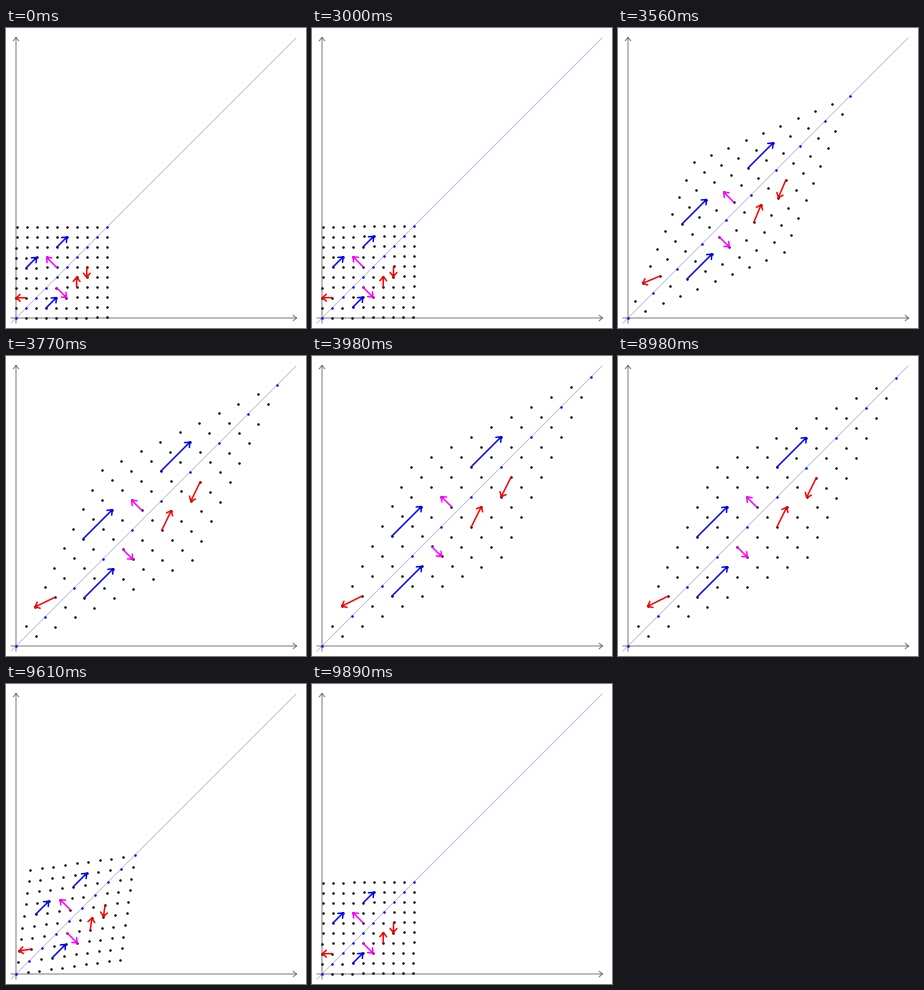
A matplotlib script for the animation above (9960 ms loop, 300 by 300 pixels).

```python
import numpy as np
import matplotlib.pyplot as plt
from matplotlib.animation import FuncAnimation

SIZE, DPI = 300, 100
LOOP, INTERVAL, STEP = 9960, 20, 70
STRETCH_AT, RETURN_AT, LAST = 3000, 8980, 15
ORIGIN, UNIT = np.array([10, 290]), 10
HEAD, SPREAD = 5.3, np.radians(40)

BLUE, MAGENTA, RED = "#0000ff", "#ff00ff", "#ff0000"

# start point, direction and colour of each vector
VECTORS = [
    ((3, 1), (1, 1), BLUE),
    ((1, 5), (1, 1), BLUE),
    ((4, 7), (1, 1), BLUE),
    ((4, 5), (-1, 1), MAGENTA),
    ((4, 3), (1, -1), MAGENTA),
    ((1, 2), (-1, 0), RED),
    ((6, 3), (0, 1), RED),
    ((7, 5), (0, -1), RED),
]


def px(size):
    return size * 72 / DPI


def to_stage(points):
    return ORIGIN + np.asarray(points) * (UNIT, -UNIT)


def arrow_path(tail, tip, head=HEAD):
    """Shaft and open head as one polyline in stage pixels."""
    tail, tip = np.asarray(tail, float), np.asarray(tip, float)
    dx, dy = tail - tip
    back = np.arctan2(dy, dx)
    legs = [tip + head * np.array([np.cos(a), np.sin(a)])
            for a in (back - SPREAD, back + SPREAD)]
    gap = (np.nan, np.nan)
    return np.array([tail, tip, gap, legs[0], tip, legs[1]]).T


def matrix(ms):
    """Sigmoid blend from the identity to [[2, 1], [1, 2]] and back."""
    if ms < STRETCH_AT:
        k = 0
    elif ms < RETURN_AT:
        k = min((ms - STRETCH_AT) // STEP + 1, LAST)
    else:
        k = max(LAST - 1 - (ms - RETURN_AT) // STEP, 0)
    s = 1 / (1 + np.exp(5 - 10 * k / LAST))
    return np.eye(2) + s * np.ones((2, 2))


plt.rcParams["path.snap"] = False  # keep sub-pixel positions
fig = plt.figure(figsize=(SIZE / DPI, SIZE / DPI), dpi=DPI, facecolor="white")
ax = fig.add_axes([0, 0, 1, 1])
ax.set_xlim(0, SIZE)
ax.set_ylim(SIZE, 0)
ax.axis("off")

ax.plot([5, 290], [295, 10], color="#b4b4dc", lw=px(0.8))
for tail, tip in (((5, 290), (290.5, 290)), ((10, 295), (10, 9.5))):
    ax.plot(*arrow_path(tail, tip, 4.2), color="#7c7c7c", lw=px(1))

grid = np.array([(x, y) for x in range(10) for y in range(10)])
on_axis = grid[:, 0] == grid[:, 1]
groups = [(grid[~on_axis], "black"), (grid[on_axis], BLUE)]
dots = [ax.plot([], [], "o", color=c, ms=px(2.5), mew=0, snap=False)[0]
        for _, c in groups]
arrows = [ax.plot([], [], color=c, lw=px(1.5), solid_capstyle="round")[0]
          for _, _, c in VECTORS]


def draw(i):
    # sample mid-interval, since steps fall on multiples of 10 ms
    m = matrix(i * INTERVAL + INTERVAL // 2)
    for line, (pts, _) in zip(dots, groups):
        line.set_data(*to_stage(pts @ m.T).T)
    for line, (start, vec, _) in zip(arrows, VECTORS):
        tail = np.array(start)
        ends = to_stage(np.array([tail, tail + vec]) @ m.T)
        line.set_data(*arrow_path(*ends))
    return dots + arrows


anim = FuncAnimation(fig, draw, frames=LOOP // INTERVAL, interval=INTERVAL,
                     init_func=lambda: draw(0), repeat=True, repeat_delay=0)
plt.show()
```
